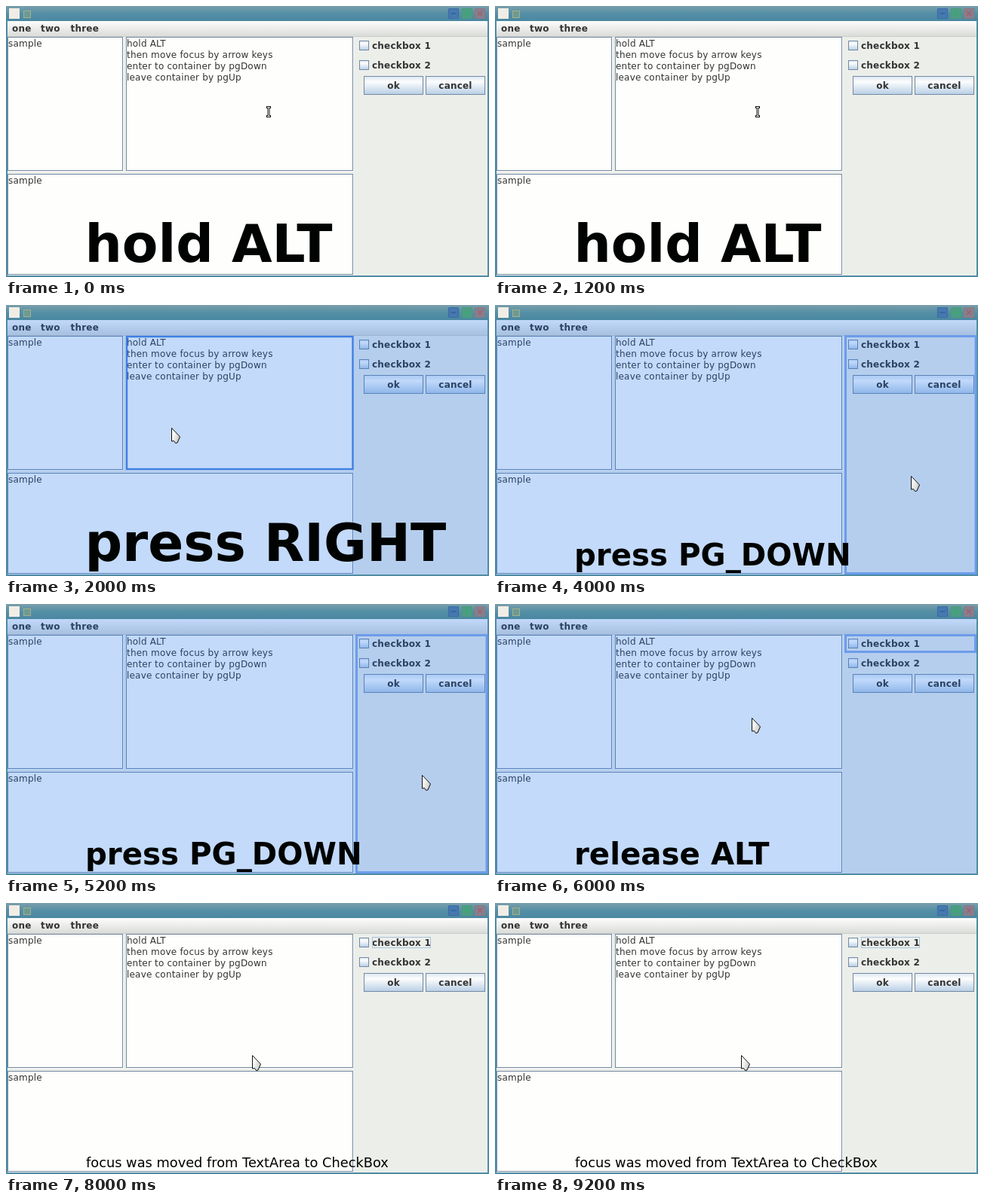
Recreate the animation shown at these times as an HTML page. Size 640 by 360 pixels, loop 10 s.

```html
<!DOCTYPE html>
<html lang="en">
<head>
<meta charset="utf-8">
<title>Focus by arrow keys</title>
<style>
  html, body { margin: 0; width: 100%; height: 100%; overflow: hidden; background: #4f8ca4; }
  svg { display: block; width: 640px; height: 360px; }
  text { font-family: "DejaVu Sans", sans-serif; white-space: pre; }
  .ui text { font-size: 12px; letter-spacing: .2px; fill: #333; }
  .ui .bold text { font-weight: bold; }
  .field { fill: #fefefc; stroke: #7389a3; }
  .shine { fill: none; stroke: #fafaf8; }
  .box { fill: url(#metal); stroke: #7389a3; }
  .caption { fill: #000301; font-weight: bold; }
  .ring { fill: none; stroke: #6c9ceb; stroke-width: 3; }

  /* Each scene holds for a fifth of the loop; the tint spans three scenes. */
  .scene { visibility: hidden; animation: scene 10s step-end infinite; animation-delay: calc(var(--n) * 2s - 10s); }
  .tint { visibility: hidden; animation: tint 10s step-end -8s infinite; }
  @keyframes scene { 0% { visibility: visible; } 20%, 100% { visibility: hidden; } }
  @keyframes tint { 0% { visibility: visible; } 60%, 100% { visibility: hidden; } }
</style>
</head>
<body>
<svg viewBox="0 0 640 360" xmlns="http://www.w3.org/2000/svg">
  <defs>
    <linearGradient id="title" x2="0" y2="1">
      <stop stop-color="#7a9fab"/><stop offset=".5" stop-color="#548fa6"/><stop offset="1" stop-color="#4a87a1"/>
    </linearGradient>
    <linearGradient id="menu" x2="0" y2="1">
      <stop stop-color="#fdfdfc"/><stop offset="1" stop-color="#dadcd9"/>
    </linearGradient>
    <linearGradient id="metal" x2="0" y2="1">
      <stop stop-color="#dde8f3"/><stop offset=".3" stop-color="#fcfdfd"/><stop offset="1" stop-color="#b8cfe5"/>
    </linearGradient>
    <linearGradient id="shade" x2="1" y2=".6">
      <stop offset=".3" stop-color="#fff"/><stop offset="1" stop-color="#c8c8c4"/>
    </linearGradient>
    <path id="arrow" d="M.5 .5V18L3.5 17.5L5.5 20.5L8 20L11.5 12Z" fill="url(#shade)" stroke="#111" stroke-linejoin="round"/>
  </defs>

  <!-- window frame -->
  <rect width="640" height="360" fill="#4f8ca4"/>
  <rect width="640" height="20" fill="url(#title)"/>
  <rect x="4" y="3" width="14" height="14" fill="#f1ede6"/>
  <rect x="23.5" y="6.5" width="9" height="9" fill="#6d9a93" stroke="#a3b18b"/>
  <g fill="none" stroke-width="1.2">
    <rect x="586.5" y="3.5" width="13" height="13" rx="1" fill="#4679ae" stroke="#3c6ca6"/>
    <path d="M589.5 10H596.5" stroke="#2c5a9e"/>
    <rect x="604.5" y="3.5" width="13" height="13" rx="1" fill="#4f9b86" stroke="#45a074"/>
    <path d="M607.5 10H614.5M611 6.5V13.5" stroke="#2fb062"/>
    <rect x="621.5" y="3.5" width="13" height="13" rx="1" fill="#85808e" stroke="#957480"/>
    <path d="M625 7L631 13M631 7L625 13" stroke="#a95a66"/>
  </g>

  <g class="ui">
    <rect x="2" y="20" width="636" height="338" fill="#eceeea"/>
    <rect x="2" y="20" width="636" height="20" fill="url(#menu)"/>
    <path d="M2 40.5H638" stroke="#cbcdca"/>

    <rect class="shine" x="3.5" y="42.5" width="152" height="177"/>
    <rect class="field" x="2.5" y="41.5" width="152" height="177"/>
    <rect class="shine" x="160.5" y="42.5" width="300" height="177"/>
    <rect class="field" x="159.5" y="41.5" width="300" height="177"/>
    <rect class="shine" x="3.5" y="224.5" width="457" height="133"/>
    <rect class="field" x="2.5" y="223.5" width="457" height="133"/>

    <text x="3" y="54">sample</text>
    <text x="3" y="236">sample</text>
    <text x="160" y="54">hold ALT</text>
    <text x="160" y="69">then move focus by arrow keys</text>
    <text x="160" y="84">enter to container by pgDown</text>
    <text x="160" y="99">leave container by pgUp</text>

    <rect class="box" x="468.5" y="46.5" width="12" height="12"/>
    <rect class="box" x="468.5" y="72.5" width="12" height="12"/>
    <rect class="box" x="474.5" y="93.5" width="78" height="24"/>
    <rect class="box" x="556.5" y="93.5" width="78" height="24"/>
    <g class="bold">
      <text x="8" y="34">one</text>
      <text x="46" y="34">two</text>
      <text x="85.5" y="34">three</text>
      <text x="485" y="57">checkbox 1</text>
      <text x="485" y="83">checkbox 2</text>
      <text x="513.5" y="110" text-anchor="middle">ok</text>
      <text x="595.5" y="110" text-anchor="middle">cancel</text>
    </g>
  </g>

  <rect class="tint" x="2" y="20" width="636" height="338" fill="rgb(18,110,242)" fill-opacity=".25"/>

  <g class="scene" style="--n:0">
    <text class="caption" x="104.5" y="340" font-size="69.3">hold ALT</text>
    <g fill="none" stroke-linecap="square">
      <path id="beam" d="M346.5 134.5H349.5M348 135V146M346.5 146.5H349.5" stroke="#111" stroke-width="3"/>
      <path d="M346.5 134.5H349.5M348 135V146M346.5 146.5H349.5" stroke="#fff"/>
    </g>
  </g>

  <g class="scene" style="--n:1">
    <rect class="ring" x="160" y="42" width="299.5" height="176" style="stroke:#3f7fe2;stroke-width:2.4"/>
    <text class="caption" x="104.5" y="340" font-size="69.3">press RIGHT</text>
    <use href="#arrow" x="219" y="163"/>
  </g>

  <g class="scene" style="--n:2">
    <rect class="ring" x="464.5" y="41.5" width="172.5" height="315"/>
    <text class="caption" x="105" y="346" font-size="40.3">press PG_DOWN</text>
    <use href="#arrow" x="551" y="227"/>
  </g>

  <g class="scene" style="--n:3">
    <rect class="ring" x="464.5" y="41.5" width="172" height="22"/>
    <text class="caption" x="105" y="346" font-size="40.3">release ALT</text>
    <use href="#arrow" x="340" y="151"/>
  </g>

  <g class="scene" style="--n:4">
    <rect x="485.5" y="45.5" width="77" height="14" fill="none" stroke="#a6c3de"/>
    <text class="caption" x="106" y="351" font-size="17.8" style="font-weight:normal">focus was moved from TextArea to CheckBox</text>
    <use href="#arrow" x="326" y="202"/>
  </g>
</svg>
</body>
</html>
```
